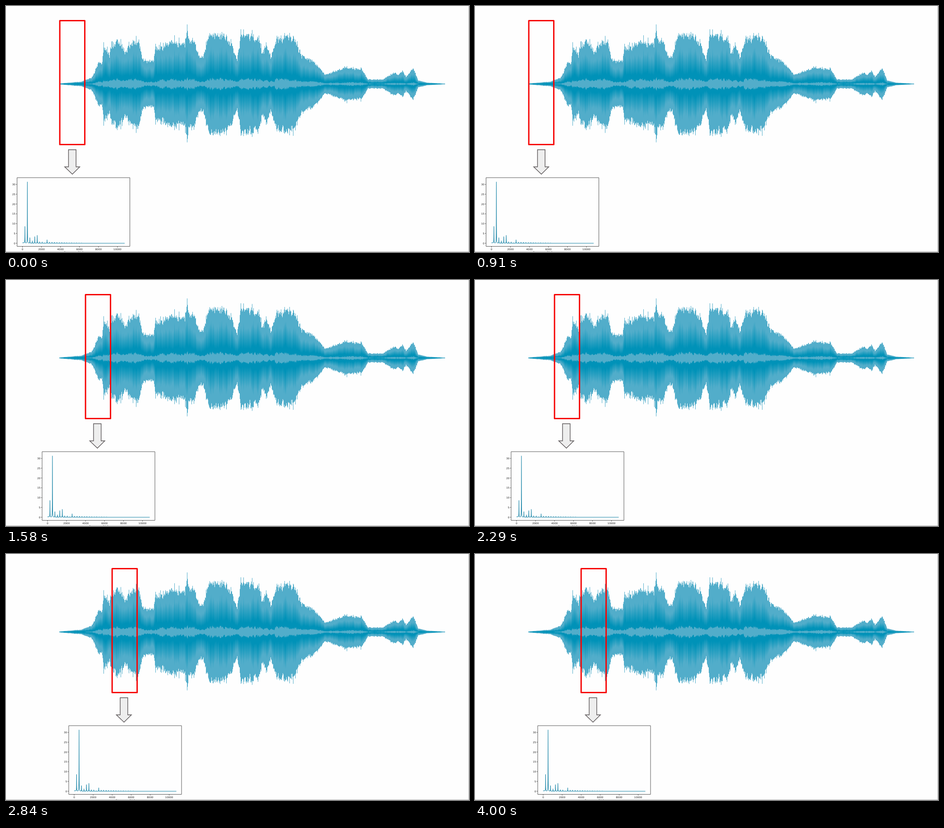
Animation of 1026x546 px, one loop 4.77 s. Source, as an HTML page with a canvas:

```html
<!DOCTYPE html>
<html lang="en">
<head>
<meta charset="utf-8">
<title>Sliding window spectrum</title>
<style>
  html, body { margin: 0; width: 100%; height: 100%; overflow: hidden; background: #fefefe; }
  canvas, svg { position: absolute; left: 0; top: 0; }
  #frame, #sides { fill: none; stroke: #f60505; stroke-width: 3; stroke-linejoin: round; }
  #sides { filter: url(#smear); stroke-width: 5; }
  #arrow { fill: #eee; stroke: #5a5557; stroke-width: 1.4; }
  #axes { fill: none; stroke: #555; stroke-width: 1; }
  #line { fill: none; stroke: #1c86a8; stroke-width: 1.1; stroke-linejoin: round; }
  text { font: 5.6px "DejaVu Sans", sans-serif; fill: #222; }
  .soft #chart { filter: url(#blur); }
  .soft #arrow { stroke-width: 3; }
  .soft #axes { stroke-width: 1.6; }
  .soft #line { opacity: .75; }
</style>
</head>
<body>
<canvas id="wave" width="1026" height="546"></canvas>
<canvas id="low" width="1026" height="546"></canvas>
<svg id="stage" width="1026" height="546" viewBox="0 0 1026 546">
  <defs>
    <filter id="blur" color-interpolation-filters="sRGB"><feGaussianBlur stdDeviation="1.3 1"/></filter>
    <filter id="smear" x="-20%" width="140%" color-interpolation-filters="sRGB"><feGaussianBlur stdDeviation="2 0"/></filter>
  </defs>
  <path d="M1025.5 0V545.5H0" fill="none" stroke="#b4b4b4"/>
  <g id="box">
    <path id="sides" d="M119.8 180V307M175.4 180V307"/>
    <path id="frame"/>
  </g>
  <g id="chart">
    <path id="arrow" d="M138.5 319H155.3V357H163.5L147 373.3L130 357H138.5Z"/>
    <path id="axes"/>
    <path id="line"/>
    <g id="labels"></g>
  </g>
</svg>
<script>
const $ = id => document.getElementById(id);
const W = 1026, H = 546, MID = 173, CUT = 180, LEFT = 118, RIGHT = 973;

// Key points of the loudness curve: x, height
const keys = [
  [118, 1], [166, 5], [190, 14], [204, 45], [213, 46], [216, 86], [229, 62], [234, 86],
  [246, 98], [264, 68], [270, 84], [294, 102], [301, 57], [327, 50], [331, 80], [367, 94],
  [398, 94], [401, 130], [404, 104], [416, 96], [424, 66], [436, 58], [451, 110], [490, 108],
  [499, 94], [512, 54], [521, 112], [560, 104], [568, 68], [576, 88], [587, 60], [599, 106],
  [637, 100], [655, 66], [690, 44], [706, 20], [750, 37], [787, 34], [802, 10], [835, 10],
  [862, 27], [869, 21], [879, 30], [886, 14], [902, 36], [913, 8], [932, 3], [973, .6]
];

let seed = 7;
function rand() {
  seed = seed + 0x6D2B79F5 | 0;
  let t = Math.imul(seed ^ seed >>> 15, 1 | seed);
  t = t + Math.imul(t ^ t >>> 7, 61 | t) ^ t;
  return ((t ^ t >>> 14) >>> 0) / 4294967296;
}
const spread = size => (rand() * 2 - 1) * size;

function loudness(x) {
  const i = keys.findIndex(k => k[0] > x);
  const [x0, h0] = keys[i - 1], [x1, h1] = keys[i];
  return h0 + (h1 - h0) * (x - x0) / (x1 - x0);
}

function drawWave(c) {
  const dark = "#0092b8", light = "#52adca";
  let streak = 0, ripple = 0, thick = 0;
  for (let x = LEFT; x < RIGHT; x++) {
    const loud = loudness(x);
    streak = streak * .7 + spread(.06);
    ripple = ripple * .6 + spread(.05);
    thick = thick * .6 + spread(.25);
    const spike = .16 * rand() ** 9;
    const core = Math.max(0, loud * .1 * (1 + thick) - .6);
    for (const side of [-1, 1]) {
      const h = Math.max(.9, loud * (.97 + ripple + spike + spread(.05)));
      const end = MID + side * h, g = c.createLinearGradient(0, MID, 0, end);
      g.addColorStop(.24 + streak * .6, dark);
      g.addColorStop(.68 + streak, light);
      c.fillStyle = g;
      c.fillRect(x, Math.min(MID, end), 1, h);
      c.fillStyle = light;
      c.fillRect(x, side < 0 ? MID - core : MID, 1, core);
    }
  }
}

// Blurred copy of the lower half
function drawLow(c) {
  c.beginPath();
  c.rect(0, CUT, W, H);
  c.clip();
  c.fillStyle = "#fefefe";
  c.fillRect(0, 0, W, H);
  c.filter = "blur(1.6px)";
  c.drawImage($("wave"), 1, 0);
}

const X0 = 36.5, Y0 = 526.5, DX = 42.1, DY = 21.75, HARMONIC = 5.45;

function label(str, x, y, anchor) {
  const t = document.createElementNS("http://www.w3.org/2000/svg", "text");
  t.setAttribute("x", x);
  t.setAttribute("y", y);
  t.setAttribute("text-anchor", anchor);
  t.textContent = str;
  $("labels").append(t);
}

function drawAxes() {
  let d = "M24.5 381H274.5V533.5H24.5Z";
  for (let i = 0; i <= 6; i++) {
    const y = Y0 - i * DY;
    d += `M24.5 ${y}h-2.5`;
    label(i * 5, 20.8, y + 2.1, "end");
  }
  for (let i = 0; i <= 5; i++) {
    const x = X0 + i * DX;
    d += `M${x} 533.5v2.5`;
    label(i * 2000, x, 542, "middle");
  }
  label("Frequency [Hz]", 149.8, 548.6, "middle");
  $("axes").setAttribute("d", d);
}

// Evenly spaced harmonics: the strong ones, then a fading tail
function drawSpectrum() {
  const strong = [39, 136, 13, 5, 15.5, 17.5, 3.5, 3, 1, 7.5];
  const height = n => strong[n - 1] ?? 3 * Math.exp((10 - n) / 8);
  const pts = [];
  for (let x = X0; x <= 263; x += .1) {
    let y = Y0 - (x < X0 + HARMONIC ? .8 : 0);
    for (let n = 1; n <= 24; n++) {
      y -= height(n) / (1 + ((x - X0 - n * HARMONIC) / .18) ** 2);
    }
    pts.push(x.toFixed(1) + " " + y.toFixed(2));
  }
  $("line").setAttribute("d", "M" + pts.join("L"));
}

// start, box shift, chart shift
const stops = [[0, 0, 0], [1510, 57, 55.5], [2770, 116, 114.5]];
const LOOP = 4770, SETTLE = 70;
const whole = "M119.2 32.5H174.6V307.5H119.2Z";
const split = "M119.2 180V32.5H174.6V180M119.2 307.5H175.6";

function show(now) {
  const t = Math.max(0, now - start) % LOOP;
  const [from, box, chart] = stops.findLast(s => s[0] <= t);
  const soft = from > 0 && t < from + SETTLE;
  $("box").setAttribute("transform", `translate(${box} 0)`);
  $("chart").setAttribute("transform", soft
    ? `translate(${chart - 1.2} 0) scale(1.013 1)`
    : `translate(${chart} 0)`);
  $("frame").setAttribute("d", soft ? split : whole);
  $("sides").style.display = $("low").style.display = soft ? "" : "none";
  $("stage").classList.toggle("soft", soft);
  requestAnimationFrame(show);
}

drawWave($("wave").getContext("2d"));
drawLow($("low").getContext("2d"));
drawAxes();
drawSpectrum();
const start = performance.now();
show(start);
</script>
</body>
</html>
```
